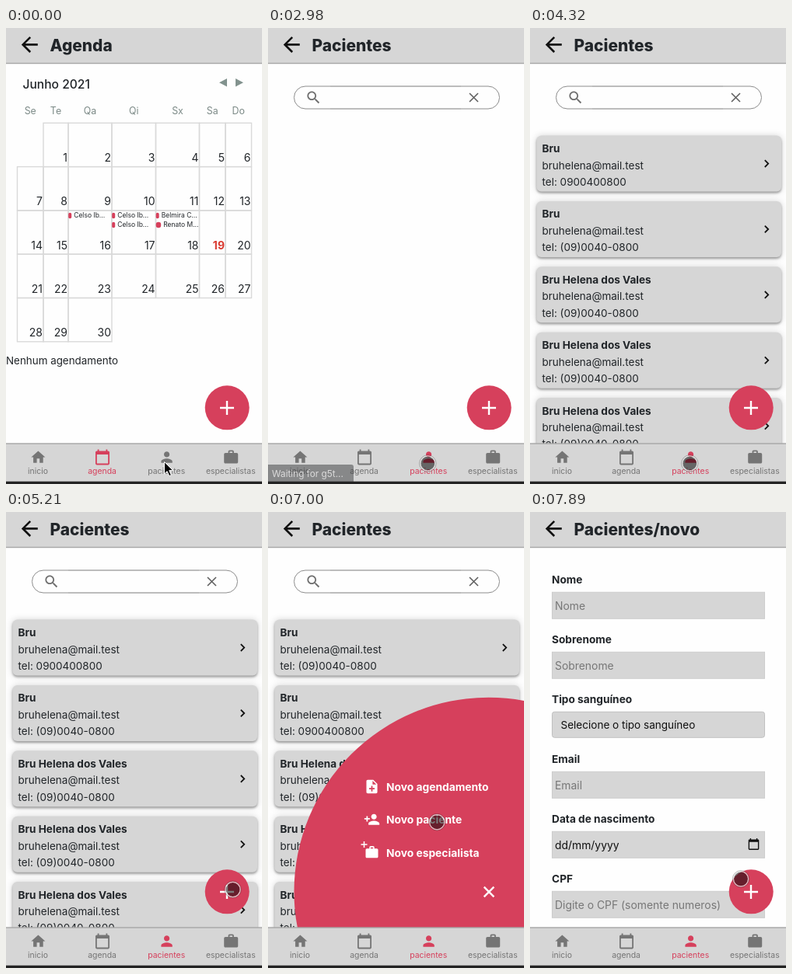
Recreate the animation shown at these times as an HTML page. Size 329 by 587 pixels, loop 8000 ms.

```html
<!DOCTYPE html>
<html lang="pt">
<head>
<meta charset="utf-8">
<title>Agenda</title>
<style>
html, body { margin: 0; width: 100%; height: 100%; overflow: hidden; background: #fefefe; }
svg { display: block; width: 100%; height: 100%; font: 13.5px Inter, "Open Sans", sans-serif; }
text { white-space: pre; }
.card { filter: drop-shadow(0 2px 1.5px rgba(0,0,0,.34)) drop-shadow(0 0 4px rgba(0,0,0,.16)); }
</style>
</head>
<body>
<svg id="stage" viewBox="0 0 329 587"></svg>
<script>
const LOOP = 8000;
const RED = '#d6405c', BAR = '#d6d6d6', INK = '#212529', GREY = '#757575', EDGE = '#a6a6a6';

const ICON = {
  back: 'M20 11H7.83l5.59-5.59L12 4l-8 8 8 8 1.41-1.41L7.83 13H20z',
  home: 'M10 20v-6h4v6h5v-8h3L12 3 2 12h3v8z',
  day: 'M20 3h-1V1h-2v2H7V1H5v2H4c-1.1 0-2 .9-2 2v16c0 1.1.9 2 2 2h16c1.1 0 2-.9 2-2V5c0-1.1-.9-2-2-2zm0 18H4V8h16z',
  person: 'M12 12c2.21 0 4-1.79 4-4s-1.79-4-4-4-4 1.79-4 4 1.79 4 4 4zm0 2c-2.67 0-8 1.34-8 4v2h16v-2c0-2.66-5.33-4-8-4z',
  work: 'M20 6h-4V4c0-1.1-.9-2-2-2h-4c-1.1 0-2 .9-2 2v2H4c-1.1 0-2 .9-2 2v11c0 1.1.9 2 2 2h16c1.1 0 2-.9 2-2V8c0-1.1-.9-2-2-2zm-6 0h-4V4h4z',
  note: 'M14 2H6c-1.1 0-2 .9-2 2v16c0 1.1.9 2 2 2h12c1.1 0 2-.9 2-2V8zm2 14h-3v3h-2v-3H8v-2h3v-3h2v3h3zm-3-7V3.5L18.5 9z',
  add: 'M15 12c2.21 0 4-1.79 4-4s-1.79-4-4-4-4 1.79-4 4 1.79 4 4 4zm-9-2V7H4v3H1v2h3v3h2v-3h3v-2zm9 4c-2.67 0-8 1.34-8 4v2h16v-2c0-2.66-5.33-4-8-4z',
  search: 'M15.5 14h-.79l-.28-.27C15.41 12.59 16 11.11 16 9.5 16 5.91 13.09 3 9.5 3S3 5.91 3 9.5 5.91 16 9.5 16c1.61 0 3.09-.59 4.23-1.57l.27.28v.79l5 4.99L20.49 19zm-6 0C7.01 14 5 11.99 5 9.5S7.01 5 9.5 5 14 7.01 14 9.5 11.99 14 9.5 14z'
};

// Markup helpers
const tag = (name, attrs, body = '') =>
  `<${name} ${Object.entries(attrs).map(([k, v]) => `${k}="${v}"`).join(' ')}>${body}</${name}>`;
const text = (x, y, s, size = 13.5, more = {}) =>
  tag('text', { x, y, 'font-size': size, fill: INK, ...more }, s);
const bold = (x, y, s, size = 13.7, more = {}) => text(x, y, s, size, { 'font-weight': 700, ...more });
const rect = (x, y, width, height, fill, more = {}) => tag('rect', { x, y, width, height, fill, ...more });
const line = (d, stroke, width, more = {}) =>
  tag('path', { d, fill: 'none', stroke, 'stroke-width': width, ...more });
const icon = (name, cx, cy, scale, fill) => tag('path', {
  d: ICON[name], fill, 'fill-rule': 'evenodd',
  transform: `translate(${cx} ${cy}) scale(${scale}) translate(-12 -12)`
});
const group = (id, body) => tag('g', { id }, body);

function calendar() {
  const xs = [14.5, 48, 80, 136, 192.5, 248.5, 282, 315.5], top = 122.3, step = 56.3;
  let s = text(21.5, 78, 'Junho 2021', 15.6, { 'font-weight': 500 });
  s += tag('path', { d: 'M284 65v10.5l-10-5.25zM295 65v10.5l10-5.25z', fill: '#82928e' });
  ['Se', 'Te', 'Qa', 'Qi', 'Sx', 'Sa', 'Do'].forEach((d, i) => {
    s += text((xs[i] + xs[i + 1]) / 2, 111, d, 12.4, { fill: '#7c8a87', 'text-anchor': 'middle' });
  });
  for (let n = 1; n <= 30; n++) {
    const col = n % 7, y = top + Math.floor(n / 7) * step;
    s += rect(xs[col], y, xs[col + 1] - xs[col], step, 'none', { stroke: '#d9d9d9', 'stroke-width': 1.4 });
    const today = n === 19 ? { fill: '#d93a30', 'font-weight': 700 } : {};
    s += text(xs[col + 1] - 1, y + 49.7, n, 14, { 'text-anchor': 'end', ...today });
  }
  const event = (col, row, who, w = 4) => {
    const x = xs[col], y = 241.5 + row * 12;
    s += rect(x + .2, y - 3.8, w, 7.6, RED, { rx: w / 2 });
    s += text(x + w + 3.2, y + 2.8, who, 8.5);
  };
  event(2, 0, 'Celso Ib...');
  event(3, 0, 'Celso Ib...');
  event(3, 1, 'Celso Ib...');
  event(4, 0, 'Belmira C...');
  event(4, 1, 'Renato M...', 6.5);
  return s + text(0, 433, 'Nenhum agendamento', 13.4);
}

function searchBox() {
  return rect(33.5, 75, 264, 29, '#fefefe', { rx: 14.5, stroke: '#8c8c8c' }) +
    line('M80 75H248M80 104H248', '#b4b4b4', 1) +
    icon('search', 58.5, 89.5, .9, '#707070') +
    line('M259 84l11 11M270 84l-11 11', '#606060', 1.6);
}

function cards() {
  let s = '';
  for (let i = 0; i < 5; i++) {
    const y = 138.5 + i * 84.4;
    s += rect(8.5, y, 314.5, 72, BAR, { rx: 6, class: 'card' });
    s += bold(15.5, y + 21.5, i < 2 ? 'Bru' : 'Bru Helena dos Vales', 13.6);
    s += text(15.5, y + 43, 'bruhelena@mail.test');
    s += text(15.5, y + 64.3, '', 13.5, { class: 'tel' });
    s += line(`M301.8 ${y + 31.7}l4.4 4.4-4.4 4.4`, '#111', 1.8);
  }
  return s;
}

function form() {
  const fields = ['Nome', 'Sobrenome', 'Tipo sanguíneo', 'Email', 'Data de nascimento', 'CPF'];
  const hints = ['Nome', 'Sobrenome', 'Selecione o tipo sanguíneo', 'Email', 'dd/mm/yyyy', 'Digite o CPF (somente numeros)'];
  return fields.map((name, i) => {
    const y = 92 + i * 77, select = i === 2, dark = select || i === 4;
    return bold(28, y, name) +
      rect(28.5, y + 11.3, 273, select ? 33 : 34, BAR, { rx: select ? 3 : 0, stroke: select ? '#c0c0c0' : '#cdcdcd' }) +
      text(select ? 39.5 : 32, y + (select ? 32.5 : 33.5), hints[i], select ? 13.55 : 13.9, { fill: dark ? '#111' : '#777' });
  }).join('') + icon('day', 287.5, 427.5, .68, '#111');
}

function nav() {
  const tabs = [['home', 'inicio'], ['day', 'agenda'], ['person', 'pacientes'], ['work', 'especialistas']];
  return rect(0, 535, 329, 50, BAR) + rect(0, 534.3, 329, 1.4, EDGE) +
    tabs.map(([name, label], i) => {
      const x = 41 + i * 82.6;
      return tag('g', { class: 'tab' }, icon(name, x + .4, 552.5, .9, 'currentColor') +
        text(x, 574, label, 10.45, { fill: 'currentColor', 'text-anchor': 'middle' }));
    }).join('') + rect(0, 583.7, 329, 4, '#232323');
}

function menuItems() {
  const rows = [['note', 'Novo agendamento'], ['add', 'Novo paciente'], ['work', 'Novo especialista']];
  return rows.map(([name, label], i) => {
    const y = 353.5 + i * 42.3;
    return icon(name, 133.5, y, name === 'work' ? .8 : .88, '#fff') + bold(152, y + 5.5, label, 13.8, { fill: '#fff' });
  }).join('') + line('M119.5 428h8M123.5 424v8', '#fff', 1.5);
}

const stage = document.getElementById('stage');
stage.innerHTML =
  rect(0, 0, 329, 587, '#fefefe') +
  group('agenda', calendar()) +
  group('search', searchBox()) +
  group('list', cards()) +
  group('form', form()) +
  rect(0, 0, 329, 45, BAR) + rect(0, 44.8, 329, 1.4, EDGE) +
  icon('back', 30.3, 21.4, 1.31, '#111') +
  bold(56.5, 29.8, '', 20.9, { id: 'title', 'font-weight': 800 }) +
  group('loading', rect(0, 0, 329, 535, '#fff', { opacity: .8 }) +
    line('', RED, 10, { id: 'arc', 'stroke-linecap': 'round' })) +
  tag('circle', { id: 'fab', cy: 488.8, fill: RED }) +
  group('items', menuItems()) +
  line('M275 489h18M284 480v18', '#fff', 2.4, { id: 'plus' }) +
  nav() +
  group('status', tag('path', { d: 'M0 562h107q3 0 3 3v19H0z', fill: '#3b3c3e' }) +
    text(5, 578, 'Waiting for g5t...', 11.8, { fill: '#e2e2e2' })) +
  group('touch', tag('circle', { r: 9, fill: '#000', opacity: .52 }) +
    tag('circle', { r: 9.7, fill: 'none', stroke: '#e4e4e4', 'stroke-width': 1.5, opacity: .75 }) +
    tag('circle', { r: 10.7, fill: 'none', stroke: '#000', 'stroke-width': .7, opacity: .35 })) +
  tag('path', {
    id: 'arrow', d: 'M0 0v15.5l3.6-3.4 2.7 6 2.6-1.1-2.7-5.9h5z',
    transform: 'translate(203.5 558.5)', fill: '#000', stroke: '#fff', 'stroke-width': 1
  });

const $ = id => document.getElementById(id);
const show = (id, opacity) => {
  $(id).style.display = opacity ? '' : 'none';
  $(id).style.opacity = Number(opacity);
};
const tabs = [...stage.querySelectorAll('.tab')];
const tels = [...stage.querySelectorAll('.tel')];

// Last row whose start time has passed
const at = (rows, t) => rows.reduce((hit, row) => (t >= row[0] ? row : hit), rows[0]).slice(1);

// time, x, y, opacity
const TOUCH = [
  [0, 205.5, 560, 0], [1490, 205.5, 560, .5], [1640, 205.5, 560, .85], [2530, 205.3, 560.5, 1],
  [4920, 209, 555.5, 1], [5070, 257.5, 523.5, 1], [5210, 291.5, 486, 1], [5510, 290.6, 486.3, 1],
  [6700, 216, 399.5, 1], [7000, 217.2, 399.2, 1], [7740, 241.5, 430.5, 1], [7890, 271, 472.3, 1]
];
// time, centre x, radius, item opacity, plus angle
const MENU = [
  [0, 284.2, 28.5, 0, 0], [5810, 275, 110, .2, 22], [5960, 267, 190, .5, 40],
  [6110, 283.5, 250, 1, 45], [7150, 284.2, 28.5, 0, 0]
];
const STATUS = [[0, 0], [2980, .5], [3130, 0], [5810, 1], [6110, .5], [6260, 0]];
// time, arc start and end in degrees
const ARC = [[0, 0, 0], [3720, -115, -5], [3870, 108, 215]];

function arcPath(a, b) {
  const p = deg => {
    const r = deg * Math.PI / 180;
    return `${165.5 + 43.5 * Math.cos(r)} ${20 + 43.5 * Math.sin(r)}`;
  };
  return a === b ? '' : `M${p(a)}A43.5 43.5 0 0 1 ${p(b)}`;
}

function render(t) {
  const agenda = t < 2980, form = t >= 7150, loading = t >= 3580 && t < 4320;
  show('agenda', agenda);
  show('search', !agenda && !form && !loading);
  show('list', t >= 4320 && !form);
  show('form', form);
  show('loading', loading);
  $('arc').setAttribute('d', arcPath(...at(ARC, t)));
  $('title').textContent = agenda ? 'Agenda' : form ? 'Pacientes/novo' : 'Pacientes';
  tabs.forEach((tab, i) => tab.setAttribute('color', i === (agenda ? 1 : 2) ? RED : GREY));
  const plain = t < 5810 ? 0 : 1;
  tels.forEach((el, i) => el.textContent = 'tel: ' + (i === plain ? '0900400800' : '(09)0040-0800'));

  const [cx, r, opacity, turn] = at(MENU, t);
  $('fab').setAttribute('cx', cx);
  $('fab').setAttribute('r', r);
  show('items', opacity);
  $('plus').setAttribute('transform', `rotate(${turn} 284 489)`);

  show('status', at(STATUS, t)[0]);
  const [x, y, alpha] = at(TOUCH, t);
  $('touch').setAttribute('transform', `translate(${x} ${y})`);
  show('touch', alpha);
  show('arrow', t < 2390);
}

const start = performance.now();
function tick() {
  render((performance.now() - start) % LOOP);
  requestAnimationFrame(tick);
}
tick();
</script>
</body>
</html>
```
